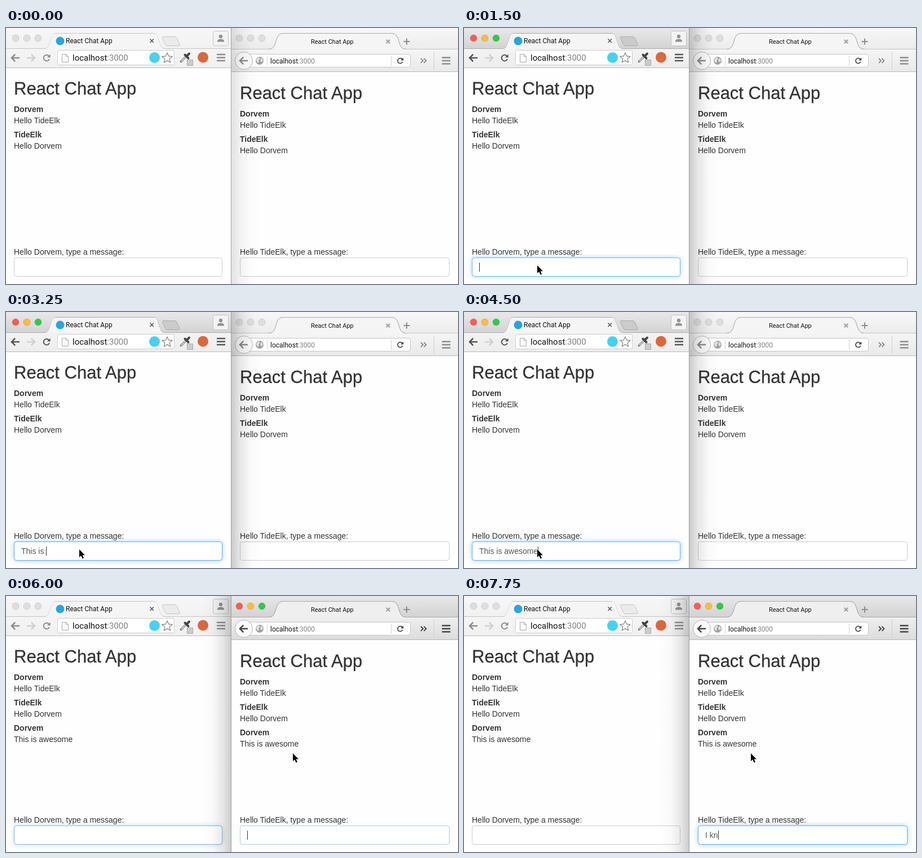
Write an HTML page that moves like this. It is 802 px wide and 454 px high and loops after 8 s.

```html
<!DOCTYPE html>
<html lang="en">
<head>
<meta charset="utf-8">
<title>React Chat App</title>
<style>
html, body { margin: 0; width: 100%; height: 100%; overflow: hidden; background: #fff; }
svg { display: block; width: 802px; height: 454px; }
text { white-space: pre; fill: #333; font: 14px "Liberation Sans", Arial, sans-serif; }
.h1 { font-size: 31px; stroke: #333; stroke-width: .3px; }
.b { font-weight: bold; }
.ui { font-family: Roboto, "Noto Sans", sans-serif; fill: #111; }
.typed { fill: #555; }
.dim { fill: #808080; }
.line { fill: none; stroke: var(--ink); }
.ink { fill: var(--ink); }
.box { fill: #fff; stroke: #ccc; }
.focus { fill: #fff; stroke: #66afe9; filter: drop-shadow(0 0 4px rgba(102, 175, 233, .6)); }
.win {
  --ink: #8c8c8c; --edge: #c4c4c4; --top: #f7f7f7; --low: #f1f1f1;
  --bar1: #f5f5f5; --bar2: #f0f0f0; --plus: #ebebeb;
  --red: #dedede; --amber: #dedede; --green: #dedede; --rim: #cdcdcd;
}
.win.on {
  --ink: #555; --edge: #aaa; --top: #e8e8e8; --low: #d3d3d3;
  --bar1: #f3f3f3; --bar2: #ededed; --plus: #cbcbcb;
  --red: #fc5b57; --amber: #fdbc40; --green: #34c84a; --rim: rgba(0, 0, 0, .14);
}
#right { --low: #ececec; --bar2: #e9e9e9; }
#right.on { --ink: #444; --low: #d2d2d2; --bar1: #efefef; --bar2: #dcdcdc; }
</style>
</head>
<body>
<svg viewBox="0 0 802 454">
  <defs>
    <g id="lights" stroke="var(--rim)">
      <circle r="6" fill="var(--red)"/>
      <circle cx="20" r="6" fill="var(--amber)"/>
      <circle cx="40" r="6" fill="var(--green)"/>
    </g>
    <g id="reload">
      <path class="line" stroke-width="2" d="M4.6-2.6A5.3 5.3 0 1 0 5 2"/>
      <path class="ink" d="M6.6-6.5V-.7H.8Z"/>
    </g>
    <path id="arrow" class="line" stroke-width="2.6" d="M8 0H-6M.2-6.3-6 0 .2 6.3"/>
    <path id="menu" class="line" stroke-width="2.6" d="M0-5.5H15M0 0H15M0 5.5H15"/>
    <g id="chat">
      <text class="h1" y="118">React Chat App</text>
      <text class="b" y="149">Dorvem</text>
      <text y="169">Hello TideElk</text>
      <text class="b" y="194">TideElk</text>
      <text y="214">Hello Dorvem</text>
      <g id="reply">
        <text class="b" y="239">Dorvem</text>
        <text y="259">This is awesome</text>
      </g>
    </g>
    <linearGradient id="shadeR">
      <stop offset="0" stop-opacity=".2"/><stop offset=".3" stop-opacity=".09"/>
      <stop offset=".65" stop-opacity=".02"/><stop offset="1" stop-opacity="0"/>
    </linearGradient>
    <linearGradient id="shadeL" href="#shadeR" x1="1" x2="0"/>
  </defs>

  <g id="left" class="win">
    <linearGradient id="topL" x2="0" y2="1">
      <stop stop-color="var(--top)" style="stop-color:var(--top)"/>
      <stop offset="1" style="stop-color:var(--low)"/>
    </linearGradient>
    <linearGradient id="barL" x2="0" y2="1">
      <stop style="stop-color:var(--bar1)"/>
      <stop offset="1" style="stop-color:var(--bar2)"/>
    </linearGradient>
    <rect width="400" height="454" fill="#fefefe"/>
    <rect width="400" height="37" fill="url(#topL)"/>
    <rect y="36" width="400" height="35" fill="url(#barL)"/>
    <path d="M0 36.5H70Q74 36 76 31L82 14Q84 9.5 88 9.5H262Q266 9.5 268 14L274 31Q276 36 280 36.5H400" fill="none" stroke="var(--edge)"/>
    <path d="M70 37Q74 36 76 31L82 14Q84 10 88 10H262Q266 10 268 14L274 31Q276 36 280 37Z" fill="#f5f5f5"/>
    <path d="M279 15.5H299Q302 15.5 303 18L308 28.500Q309 31.500 306 31.500H287Q284 31.500 283 29L277.500 18Q276.500 15.500 279 15.500Z" fill="var(--plus)" stroke="var(--edge)"/>
    <path d="M0 70.500H400" stroke="#bbb"/>
    <use href="#lights" x="17" y="18"/>
    <circle cx="96" cy="23" r="7.500" fill="#2aa5dc"/>
    <text class="ui" x="106" y="27" style="font-size:12px">React Chat App</text>
    <path d="M255.500 19.500l6.500 6.500m0-6.500-6.500 6.500" stroke="#555" stroke-width="1.600"/>
    <rect x="367.500" y="5.500" width="27" height="26" rx="3" fill="#f3f3f3" stroke="#c2c2c2"/>
    <circle cx="381" cy="15" r="3.200" fill="#929292"/>
    <path d="M375 24.500V22.500Q376 19.500 381 19.500T387 22.500V24.500Z" fill="#929292"/>
    <use href="#arrow" x="16" y="53"/>
    <use href="#arrow" transform="translate(45 53) scale(-1 1)" style="--ink:#d0d0d0"/>
    <use href="#reload" x="72" y="53"/>
    <rect class="box" x="91.500" y="39.500" width="207" height="26" rx="2.500"/>
    <path d="M99.500 46.500H106.500L110.500 50.500V60.500H99.500ZM106.500 46.500V50.500H110.500" fill="#fafafa" stroke="#a8a8a8"/>
    <text class="ui" x="118" y="58" style="font-size:15px">localhost<tspan class="dim">:3000</tspan></text>
    <circle cx="263.500" cy="52.500" r="9.500" fill="#48d0ee"/>
    <path d="M286 44l2.600 5.900 6.400.6-4.800 4.200 1.400 6.300-5.600-3.300-5.600 3.300 1.400-6.300-4.800-4.200 6.400-.6Z" fill="#fff" stroke="#777" stroke-width="1.100"/>
    <path d="M310.500 59.500 319 51" stroke="#777" stroke-width="3.600" stroke-linecap="round"/>
    <path d="M311 59 319 51" stroke="#e8e8e8" stroke-width="1.600"/>
    <path d="M317.500 47.500l6 6M320.500 50 325 45.500" stroke="#444" stroke-width="4" stroke-linecap="round"/>
    <rect x="321.500" y="56.500" width="10" height="10" fill="#ccc" stroke="#aaa"/>
    <circle cx="349.500" cy="52" r="9.500" fill="#d9683f"/>
    <use href="#menu" x="374" y="52.500"/>
    <use href="#chat" x="14"/>
    <text x="14" y="402">Hello Dorvem, type a message:</text>
    <rect class="box" x="14.500" y="407.500" width="369" height="33" rx="4"/>
    <rect class="focus" x="14.500" y="407.500" width="369" height="33" rx="4"/>
    <text class="typed" x="27" y="429"></text>
    <rect class="caret" y="416" width="1" height="16" fill="#333"/>
  </g>

  <g id="right" class="win">
    <linearGradient id="topR" x2="0" y2="1">
      <stop style="stop-color:var(--top)"/>
      <stop offset="1" style="stop-color:var(--low)"/>
    </linearGradient>
    <linearGradient id="barR" x2="0" y2="1">
      <stop style="stop-color:var(--bar1)"/>
      <stop offset="1" style="stop-color:var(--bar2)"/>
    </linearGradient>
    <rect x="400" width="402" height="454" fill="#fefefe"/>
    <rect x="400" width="402" height="38" fill="url(#topR)"/>
    <rect x="400" y="38" width="402" height="39" fill="url(#barR)"/>
    <path d="M400 37.500H466C484 37.500 474 9.500 492 9.500H684C702 9.500 692 37.500 710 37.500H802" fill="none" stroke="var(--edge)"/>
    <path d="M466 38.500C484 37.500 474 10 492 10H684C702 10 692 37.500 710 38.500Z" fill="var(--bar1)"/>
    <path d="M466 37.500C484 37.500 474 9.500 492 9.500H684C702 9.500 692 37.500 710 37.500" fill="none" stroke="#aaa"/>
    <path d="M400 77.500H802" stroke="#b6b6b6"/>
    <use href="#lights" x="414" y="18"/>
    <text class="ui" x="541" y="28" style="font-size:11px">React Chat App</text>
    <path d="M674.800 20.800l6.400 6.400m0-6.400-6.400 6.400" stroke="#a6a6a6" stroke-width="2.400"/>
    <path d="M705.500 24h11M711 18.500v11" stroke="#8c8c8c" stroke-width="2"/>
    <path d="M430 46.500H714Q717.500 46.500 717.500 50V66Q717.500 69.500 714 69.500H430Z" fill="#fff" stroke="#c6c6c6"/>
    <circle cx="422" cy="58" r="15.500" fill="#fafafa" stroke="#b4b4b4"/>
    <use href="#arrow" x="421" y="58"/>
    <circle cx="450" cy="58" r="7" fill="#a0a0a0"/>
    <path d="M445 54l4-2 2 3-3 2 1 3-2 2-3-4ZM453 53l3 4-2 4-3-3Z" fill="#e4e4e4"/>
    <path d="M463.500 50V66M683.500 49V67" stroke="#d0d0d0"/>
    <path d="M759.500 42V74" stroke="#cfcfcf"/>
    <text class="ui" x="469" y="63" style="font-size:12px">localhost<tspan class="dim">:3000</tspan></text>
    <use href="#reload" transform="translate(699.500 58) scale(.86)" style="--ink:#444"/>
    <path class="line" stroke-width="1.900" d="M736 54l4 4-4 4M741.500 54l4 4-4 4"/>
    <use href="#menu" x="773.500" y="58"/>
    <use href="#chat" x="415" y="8"/>
    <text x="415" y="402">Hello TideElk, type a message:</text>
    <rect class="box" x="415.500" y="407.500" width="371" height="33" rx="4"/>
    <rect class="focus" x="415.500" y="407.500" width="371" height="33" rx="4"/>
    <text class="typed" x="428" y="429"></text>
    <rect class="caret" y="416" width="1" height="16" fill="#333"/>
  </g>

  <rect id="castR" x="400" width="52" height="454" fill="url(#shadeR)"/>
  <rect id="castL" x="348" width="52" height="454" fill="url(#shadeL)"/>
  <path d="M399.500 0V454" stroke="#a0a0a0"/>
  <path id="mouse" d="M0 0V14L3.200 11 5.600 16.500 8 15.500 5.600 10.200H10Z" stroke="#fff" stroke-width="1.200" paint-order="stroke"/>
</svg>
<script>
const TICK = 250, LOOP = 8000;
const $ = id => document.getElementById(id);

// Each track maps a tick to the value held from then on.
const at = (track, tick) => {
  let value;
  for (const [start, v] of track) if (start <= tick) value = v;
  return value;
};

const panes = [
  {
    el: $('left'), x: 27, text: 'This is awesome',
    count: [[0, 0], [9, 1], [10, 3], [11, 5], [13, 8], [14, 9], [15, 10], [16, 11], [17, 12], [18, 15], [20, 0]],
    active: [[0, 0], [6, 1], [24, 0]],
    focus: [[0, 0], [6, .85], [7, 1], [24, .65], [25, 0]],
    caret: [[0, 0], [6, 1], [22, 0]]
  },
  {
    el: $('right'), x: 428, text: 'I kn',
    count: [[0, 0], [29, 1], [30, 3], [31, 4]],
    active: [[0, 0], [24, 1]],
    focus: [[0, 0], [24, .15], [25, 1]],
    caret: [[0, 0], [24, 1], [27, 0], [29, 1]]
  }
];
const mouse = [
  [0, null], [1, [420, 345]], [2, [330, 372]], [3, [225, 400]], [4, [150, 418]], [5, [131, 421]],
  [6, [130, 421]], [21, [210, 392]], [22, [440, 312]], [23, [570, 279]], [24, [509, 279]]
];

function drawPane(p, tick) {
  const part = name => p.el.querySelector('.' + name);
  const typed = part('typed'), count = at(p.count, tick);
  p.el.classList.toggle('on', !!at(p.active, tick));
  typed.textContent = p.text.slice(0, count);
  part('focus').style.opacity = at(p.focus, tick);
  part('caret').style.opacity = at(p.caret, tick);
  part('caret').setAttribute('x', Math.round(p.x + (count ? typed.getComputedTextLength() : 0)));
}

function draw(tick) {
  panes.forEach(p => drawPane(p, tick));
  $('reply').style.display = tick >= 20 ? '' : 'none';
  $('castR').style.opacity = at([[0, .55], [6, 1], [24, 0]], tick);
  $('castL').style.opacity = tick >= 24 ? 1 : 0;
  const tip = at(mouse, tick);
  $('mouse').style.display = tip ? '' : 'none';
  if (tip) $('mouse').setAttribute('transform', `translate(${tip})`);
}

let shown = -1;
const begin = performance.now();
function frame() {
  const tick = Math.floor((performance.now() - begin) % LOOP / TICK);
  if (tick !== shown) draw(shown = tick);
  requestAnimationFrame(frame);
}
frame();
</script>
</body>
</html>
```
